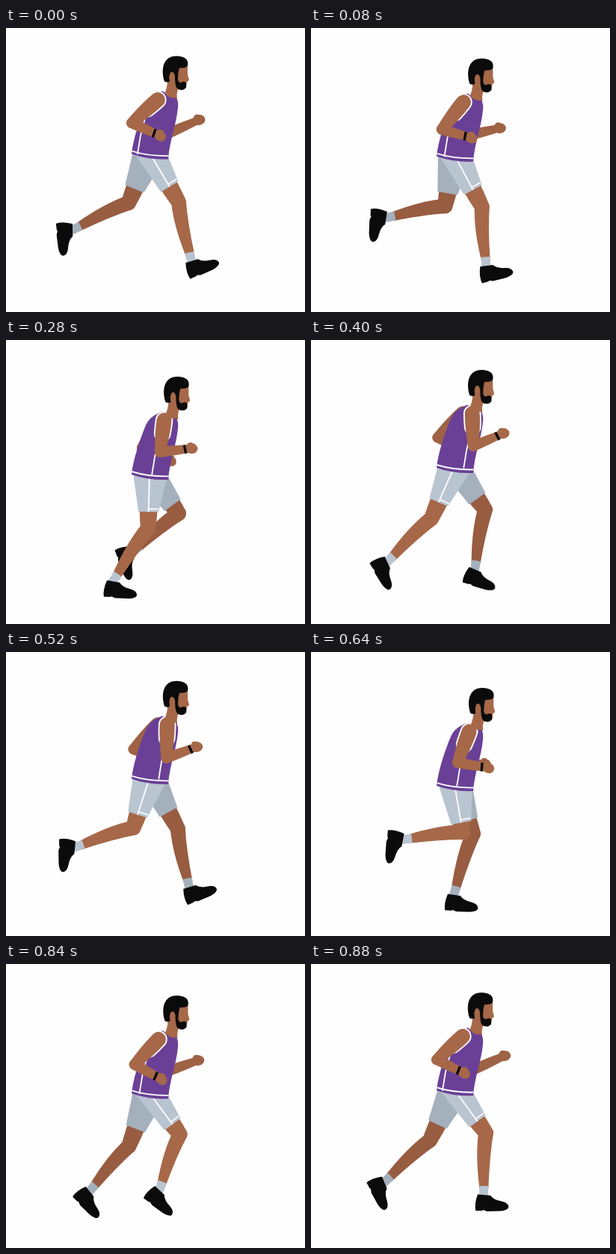
An HTML page with a canvas that plays this animation: 400 by 380 pixels, repeating every 0.96 s.

```html
<!DOCTYPE html>
<html lang="en">
<head>
<meta charset="utf-8">
<title>Runner</title>
<style>
  html, body { margin: 0; width: 100%; height: 100%; overflow: hidden; background: #fefefe; }
  canvas { display: block; width: 400px; height: 380px; }
</style>
</head>
<body>
<canvas id="stage"></canvas>
<script>
const LOOP = 960, POSES = 15, HALF = POSES / 2;
const STARTS = [0, 80, 160, 200, 280, 320, 400, 440, 520, 600, 640, 720, 760, 840, 880];

const SKIN = '#a66848', SKIN_FAR = '#985c41', ARM_FAR = '#9f6245';
const SHORTS = '#b9c4d1', SHORTS_FAR = '#a4b0bc';
const SHIRT = '#6a4097', INK = '#0c0b0c', WHITE = '#fefefe';

// phase, knee x y, ankle x y, foot angle
const LEG = [
  [0, 231, 233, 248, 312, -24],
  [2, 223, 243, 205, 324, 2],
  [2.5, 217, 243, 191, 325, 2],
  [4, 190, 252, 143, 323, 3],
  [4.5, 178, 252, 136, 319, 9],
  [6, 161, 239, 102, 297, 58],
  [6.5, 159, 236, 98, 292, 61],
  [7.5, 164, 234, 89, 270, 83],
  [9.5, 197, 242, 118, 248, 94],
  [10, 203, 241, 123, 251, 94],
  [11.5, 231, 232, 169, 284, 69],
  [12, 232, 230, 178, 290, 68],
  [13.5, 233, 227, 219, 307, 16],
  [14, 234, 226, 231, 309, -1]
];

// phase, elbow x y, hand x y
const ARM = [
  [0, 168, 127, 206, 144],
  [2, 185, 146, 226, 150],
  [4, 206, 150, 248, 145],
  [6, 217, 142, 257, 125],
  [7.5, 217, 141, 257, 123],
  [10, 196, 148, 237, 155],
  [12, 178, 142, 214, 161],
  [14, 168, 128, 205, 146]
];

const SHOE = new Path2D('M-8-1L9 1Q13 7 24 9Q33 11 33 17Q32 21 22 22L4 22L-1 20L-2 21L-11 21Q-13 12-8-1Z');
const TORSO = new Path2D('M204 87Q211 83 212 87Q217 95 228 94Q231 99 230 107C228 130 219 150 217 176Q190 177 168 169C170 150 178 125 187 103Q192 92 204 87Z');
const HEM = new Path2D('M168 165Q190 172 218 171.5');
const FACE = new Path2D('M216 56L243 51L243 63L245 70L242 73L241 80L230 83Q228 88 229 95L222 97L211 90Q216 82 216 70Z');
const HAIR = new Path2D('M212 72C207 56 210 38 228 38C239 38 245 43 243 51C241 54 236 54 232 54Q230 60 230 70Q232 75 235 73Q239 71 241 74L241 80C238 85 231 84 228 80Q226 76 226 64Q224 57 220 60Q218 64 219 72Q216 74 212 72Z');

const cv = document.getElementById('stage');
const ctx = cv.getContext('2d');
const dpr = window.devicePixelRatio || 1;
cv.width = 400 * dpr;
cv.height = 380 * dpr;

// Smooth periodic curve through the rows of a table
function sample(rows, phase) {
  const n = rows.length, p = ((phase % POSES) + POSES) % POSES;
  let i = n - 1;
  while (rows[i][0] > p) i--;
  const at = (j, c) => rows[(j + n) % n][c] + (c ? 0 : POSES * Math.floor(j / n));
  const slope = (j, c) => (at(j + 1, c) - at(j, c)) / (at(j + 1, 0) - at(j, 0));
  const gap = j => at(j + 1, 0) - at(j, 0);
  const tangent = (j, c) =>
    (gap(j) * slope(j - 1, c) + gap(j - 1) * slope(j, c)) / (gap(j - 1) + gap(j));
  const h = gap(i), u = (p - at(i, 0)) / h, v = 1 - u;
  return rows[0].slice(1).map((_, k) => {
    const c = k + 1;
    return at(i, c) * v * v * (1 + 2 * u) + at(i + 1, c) * u * u * (3 - 2 * u)
      + h * u * v * (v * tangent(i, c) - u * tangent(i + 1, c));
  });
}

function fill(path, color) {
  ctx.fillStyle = color;
  ctx.fill(path);
}

function line(points, color, width) {
  ctx.beginPath();
  points.forEach(p => ctx.lineTo(p[0], p[1]));
  ctx.strokeStyle = color;
  ctx.lineWidth = width;
  ctx.stroke();
}

function local(x, y, angle, draw) {
  ctx.save();
  ctx.translate(x, y);
  ctx.rotate(angle);
  draw();
  ctx.restore();
}

const angleOf = (a, b) => Math.atan2(b[1] - a[1], b[0] - a[0]);
const along = (a, angle, d, side = 0) => [
  a[0] + d * Math.cos(angle) - side * Math.sin(angle),
  a[1] + d * Math.sin(angle) + side * Math.cos(angle)
];

// Tapered, round-ended limb with a separate bulge on either side
function limb(a, b, ra, rb, front, back, color) {
  const len = Math.hypot(b[0] - a[0], b[1] - a[1]), q = Math.PI / 2;
  local(a[0], a[1], angleOf(a, b), () => {
    ctx.beginPath();
    ctx.moveTo(0, -ra);
    ctx.quadraticCurveTo(len * 0.42, -front, len, -rb);
    ctx.arc(len, 0, rb, -q, q);
    ctx.quadraticCurveTo(len * 0.42, back, 0, ra);
    ctx.arc(0, 0, ra, q, 3 * q);
    ctx.fillStyle = color;
    ctx.fill();
  });
}

function leg(phase, bob, near) {
  const [kx, ky, ax, ay, turn] = sample(LEG, phase);
  const skin = near ? SKIN : SKIN_FAR, cloth = near ? SHORTS : SHORTS_FAR;
  const knee = [kx, ky], ankle = [ax, ay];
  const hip = [192 + 0.1 * (kx - 192), 174 + bob];
  const thigh = angleOf(hip, knee), shin = angleOf(knee, ankle);

  limb(along(hip, thigh, 36), knee, 12, 10, 12, 12, skin);
  limb(knee, along(ankle, shin, -9), 10, 6, 6, 13, skin);
  line([along(ankle, shin, -12), along(ankle, shin, 3)], cloth, 12);
  local(ax, ay, turn * Math.PI / 180, () => fill(SHOE, INK));

  const front = along(hip, thigh, 45, -13.5), back = along(hip, thigh, 45, 13.5);
  ctx.beginPath();
  [[170, 166 + bob], [216, 170 + bob], front, back].forEach(p => ctx.lineTo(p[0], p[1]));
  ctx.fillStyle = cloth;
  ctx.fill();
  if (near) {
    line([hip, along(hip, thigh, 45)], WHITE, 1.8);
    line([along(hip, thigh, 41), along(hip, thigh, 41, -13.5)], WHITE, 1.6);
  }
}

function arm(phase, shoulder, near) {
  const [ex, ey, hx, hy] = sample(ARM, phase);
  const skin = near ? SKIN : ARM_FAR;
  const elbow = [ex, ey], hand = [hx, hy], fore = angleOf(elbow, hand);
  if (!near) hand[0] += 1;
  limb(shoulder, elbow, 10, 7, 10.5, 10.5, skin);
  limb(elbow, hand, 7, 5, 7, 7, skin);
  local(hand[0], hand[1], fore, () => {
    ctx.fillStyle = skin;
    ctx.beginPath();
    ctx.ellipse(0, 0, 8.5, 7, 0.3, 0, 7);
    ctx.ellipse(-1, -4.5, 4, 3.5, 0, 0, 7);
    ctx.fill();
  });
  if (near) line([along(hand, fore, -9, -5.5), along(hand, fore, -8, 6)], INK, 3.4);
}

function torso(bob, twist, shoulder, elbow) {
  ctx.save();
  ctx.translate(0, bob);
  fill(TORSO, SHIRT);
  ctx.clip(TORSO);
  ctx.strokeStyle = WHITE;
  ctx.lineWidth = 1.8;
  ctx.stroke(HEM);
  const x = 190.5 + 15 * twist;
  line([[x + 11, 118], [x + 4, 145], [x, 169.5]], WHITE, 1.8);
  ctx.translate(0, -bob);
  const down = angleOf(shoulder, elbow);
  limb(shoulder, along(shoulder, down, 18), 11.8, 11.4, 12, 12, WHITE);
  ctx.restore();
}

function head(bob) {
  ctx.save();
  ctx.translate(bob / 8, bob);
  fill(FACE, SKIN);
  fill(HAIR, INK);
  ctx.fillStyle = SKIN;
  ctx.beginPath();
  ctx.ellipse(221.5, 66, 3, 5, 0.1, 0, 7);
  ctx.fill();
  ctx.restore();
}

function draw(pose) {
  const bob = 5.5 - 6.2 * Math.cos(2 * Math.PI * (pose + 0.35) / HALF);
  const twist = -Math.cos(2 * Math.PI * (pose + 0.5) / POSES);
  const shoulder = side => [209.5 + 6.8 * twist * side, 96.5 + bob];

  ctx.setTransform(dpr, 0, 0, dpr, 0, 0);
  ctx.fillStyle = WHITE;
  ctx.fillRect(0, 0, 400, 380);

  arm(pose + HALF, shoulder(-1), false);
  leg(pose + HALF, bob, false);
  leg(pose, bob, true);
  head(bob);
  torso(bob, twist, shoulder(1), sample(ARM, pose));
  arm(pose, shoulder(1), true);
}

function tick() {
  const t = performance.now() % LOOP;
  let pose = POSES - 1;
  while (STARTS[pose] > t) pose--;
  draw(pose);
  requestAnimationFrame(tick);
}
tick();
</script>
</body>
</html>
```
